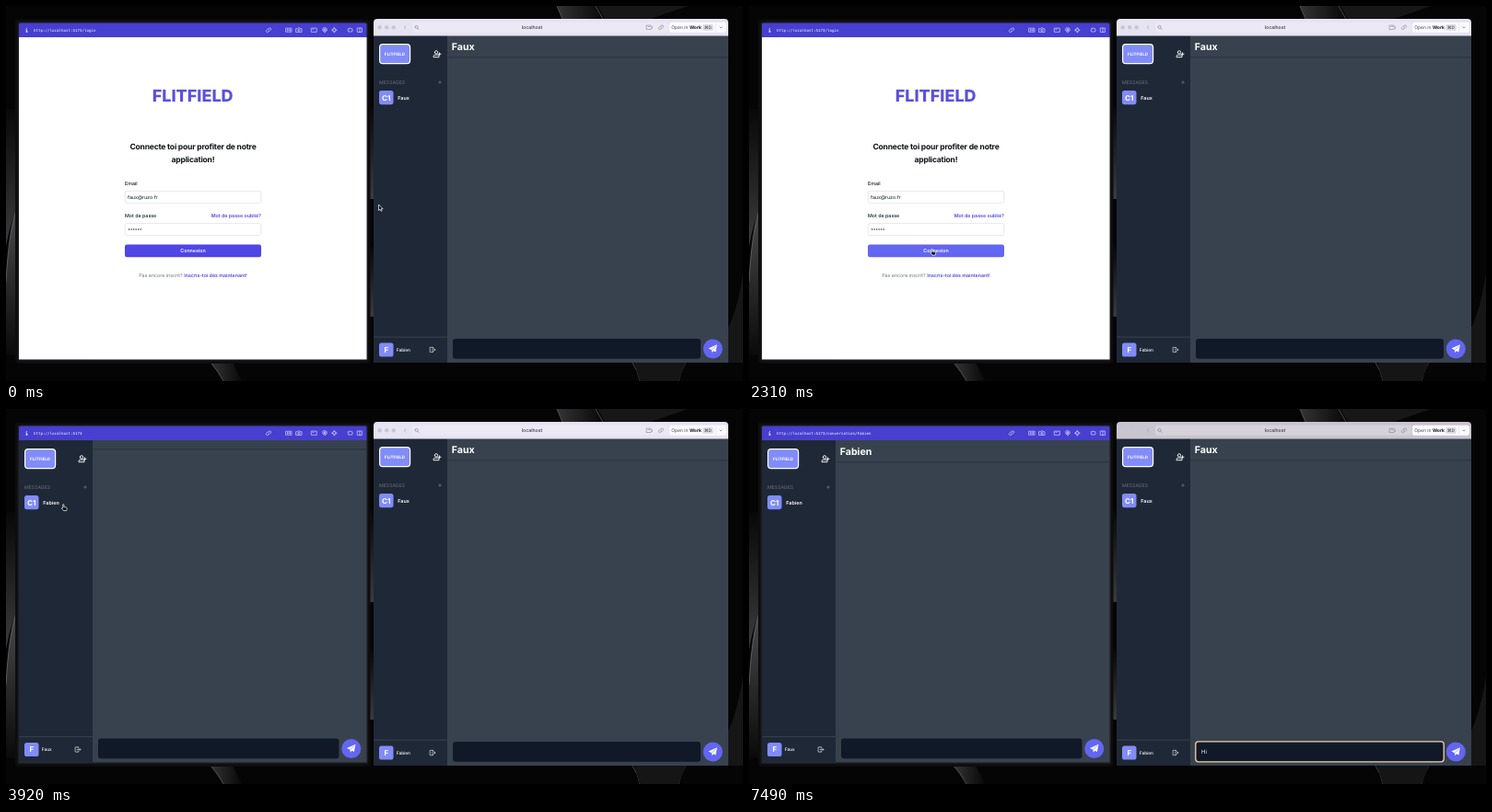
Recreate the animation shown at these times as an HTML page. Size 800x408 px, loop 8000 ms.

```html
<!DOCTYPE html>
<html lang="fr">
<head>
<meta charset="utf-8">
<title>Chat demo</title>
<style>
html, body { margin: 0; width: 100%; height: 100%; overflow: hidden; background: #050505; }
svg { display: block; width: 100vw; height: 100vh; }
text { font-family: Inter, "Liberation Sans", sans-serif; text-rendering: geometricPrecision; white-space: pre; }
.mono { font-family: "DejaVu Sans Mono", monospace; }
</style>
</head>
<body>
<svg id="stage" viewBox="0 0 800 408"></svg>
<script>
const BRAND = 'FLITFIELD', USER = 'Faux', FRIEND = 'Fabien', MAIL = 'faux@ruzo.fr';
const INDIGO = '#4f46e5', SOFT = '#818cf8';

const rect = (x, y, w, h, fill, r = 0, more = '') =>
  `<rect x="${x}" y="${y}" width="${w}" height="${h}" rx="${r}" fill="${fill}" ${more}/>`;
const text = (x, y, size, weight, fill, str, more = '') =>
  `<text x="${x}" y="${y}" font-size="${size}" font-weight="${weight}" fill="${fill}" ${more}>${str}</text>`;
const mid = 'text-anchor="middle"';
const group = (id, body, more = '') => `<g id="${id}" ${more}>${body}</g>`;
const icon = (x, y, d, color, w = .7) =>
  `<path transform="translate(${x} ${y})" d="${d}" fill="none" stroke="${color}" stroke-width="${w}" stroke-linecap="round" stroke-linejoin="round"/>`;

const ICONS = {
  link: 'M-.6 .9a1.3 1.3 0 0 0 1.9 0l1-1a1.3 1.3 0 0 0-1.9-1.9l-.5 .5M.6-.9a1.3 1.3 0 0 0-1.9 0l-1 1a1.3 1.3 0 0 0 1.9 1.9l.5-.5',
  photo: 'M-3-2H3V2H-3ZM-1.3-1V1M1.3-1V1M-1.3 0H1.3',
  camera: 'M-3-1.5H-1.4L-.9-2.3H.9L1.4-1.5H3V2.2H-3ZM-1.1 .3a1.1 1.1 0 1 0 2.2 0a1.1 1.1 0 1 0-2.2 0',
  frame: 'M-2.8-2.1H2.8V2.1H-2.8ZM-1.6-.9H-.4',
  shield: 'M0-2.6L2.2-1.6V.6L0 2.6L-2.2 .6V-1.6ZM-1-.8H1M-1 .4H1M0-1.6V1.4',
  target: 'M-1.9 0a1.9 1.9 0 1 0 3.8 0a1.9 1.9 0 1 0-3.8 0M0-2.8V-1.2M0 2.8V1.2M-2.8 0H-1.2M2.8 0H1.2',
  puzzle: 'M-2-1.6H-.7a.7 .7 0 0 1 1.4 0H2V-.6a.7 .7 0 0 1 0 1.4V1.8H-2V.8a.7 .7 0 0 1 0-1.4Z',
  split: 'M-2.4-2.2H2.4V2.2H-2.4ZM0-2.2V2.2',
  search: 'M-2-.4a1.6 1.6 0 1 0 3.2 0a1.6 1.6 0 1 0-3.2 0M.8 .9L2.2 2.3',
  person: 'M-2.7-1.6a1.7 1.7 0 1 0 3.4 0a1.7 1.7 0 1 0-3.4 0M-4 3.3V2.8a1.7 1.7 0 0 1 1.7-1.6H.3A1.7 1.7 0 0 1 2 2.8V3.3ZM2.6-1.1V1.7M1.2 .3H4',
  exit: 'M.6-2.6H-2.6V2.6H.6M-.6 0H3.2M2-1.3L3.3 0L2 1.3M.6-2.6V-1.4M.6 2.6V1.4'
};

function wallpaper() {
  const grad = (id, a, b, dir) =>
    `<linearGradient id="${id}" ${dir}><stop offset="0" stop-color="${a}"/><stop offset="1" stop-color="${b}"/></linearGradient>`;
  return `<defs>${grad('down', '#4a4a4c', '#0a0a0a', 'x2="0" y2="1"')}
    ${grad('up', '#080808', '#3c3c3e', 'x2="0" y2="1"')}${grad('side', '#343436', '#080808', '')}</defs>` +
    rect(0, 0, 800, 408, '#050505') +
    '<path d="M0 112H11V222Q4 238 0 262Z" fill="url(#up)"/>' +
    '<path d="M11 222Q3 246 0 300V380H11Z" fill="url(#down)"/>' +
    '<path d="M11 222Q3 246 0 300" fill="none" stroke="#777" stroke-width=".7"/>' +
    '<path d="M598 0H640L648 14H604Z" fill="url(#side)"/>' +
    '<path d="M642 0H740L700 14H650Z" fill="#171718"/>' +
    '<path d="M598 0L604 14M640 0L648 14" stroke="#5c5c5e" stroke-width=".8"/>' +
    '<path d="M222 388H246L256 408H236Z" fill="url(#side)"/>' +
    '<path d="M222 388Q230 396 236 408M680 388Q686 397 688 408M738 388Q732 398 730 408" fill="none" stroke="#555" stroke-width=".8"/>' +
    '<path d="M682 388H738L730 408H688Z" fill="#151516"/>' +
    '<path d="M784 388V350Q794 330 800 290V388Z" fill="#161617"/>' +
    rect(395, 110, 4, 100, 'url(#up)') + rect(395, 262, 4, 76, 'url(#up)') +
    rect(10, 14.5, 385.5, 374.5, '#0d0d0e', 4) +
    rect(12.5, 17.2, 380.5, 369, '#1b1b1e', 2);
}

// Chat page: sidebar on the left, conversation on the right
function page(id, x, y, w, h, me, other) {
  const b = y + h;
  const avatar = (ay, label) => rect(x + 6, ay, 15.5, 15.2, SOFT, 2.6) +
    text(x + 13.8, ay + 10.5, 8, 700, '#fff', label, mid);
  const line = ly => rect(x + 80, ly, w - 80, .8, '#28323f') + rect(x + 80, ly + .8, w - 80, 1, '#323c49');
  return rect(x, y, w, h, '#38424f') + rect(x, y, 80, h, '#1f2837') +
    rect(x + 6.6, y + 9.6, 33, 21, SOFT, 3.4, 'stroke="#fff" stroke-width="1.2"') +
    text(x + 23, y + 21.7, 4.5, 700, '#fff', BRAND, mid) +
    icon(x + 69, y + 20, ICONS.person, '#fff', .9) +
    text(x + 6, y + 52.9, 5.2, 400, '#6b7280', 'MESSAGES') +
    icon(x + 72, y + 51, 'M-1.4 0H1.4M0-1.4V1.4', '#8b93a0', .5) +
    group(id + 'None', text(x + 6, y + 66.7, 5.8, 600, '#fff', 'Aucune Conversations')) +
    group(id + 'List', avatar(y + 60, 'C1') + text(x + 26.3, y + 69.8, 5.4, 600, '#fff', other)) +
    rect(x, b - 28.2, 80, .6, '#46505e') + avatar(b - 21.6, me[0]) +
    text(x + 24.7, b - 12.2, 4.8, 500, '#fff', me) +
    icon(x + 63.7, b - 14, ICONS.exit, '#d5d8de', .7) +
    group(id + 'Thin', line(y + 9)) +
    group(id + 'Head', line(y + 23) + text(x + 84.7, y + 15.8, 10.6, 700, '#fff', other)) +
    group(id + 'Box', rect(x + 86, b - 26, w - 116, 21.7, '#111827', 3) +
      `<circle cx="${x + w - 16.7}" cy="${b - 15}" r="10.5" fill="#6366f1"/>` +
      `<g transform="translate(${x + w - 16.7} ${b - 15})"><path d="M4.6-4.8L-4.8-.5L-1.4 1.2L-.9 4.3L.5 2.2L3.1 3.5Z" fill="#fff"/>
       <path d="M3.4-3.3L-1.2 1.3" stroke="#6366f1" stroke-width=".6"/></g>`);
}

function login() {
  const field = y => rect(129.2, y, 147.6, 13, '#fff', 2, 'stroke="#d6d8de" stroke-width=".6"');
  let dots = '';
  for (let i = 0; i < 6; i++) dots += `<circle cx="${133.6 + i * 2.5}" cy="243" r=".75" fill="#222"/>`;
  const head = (y, s) => text(203, y, 8.55, 700, '#111318', s, mid + ' letter-spacing="-.21"');
  return rect(14, 34, 377.5, 350.5, '#fff') +
    text(202.7, 103.5, 18, 800, '#5b50dc', BRAND, mid) +
    head(156, 'Connecte toi pour profiter de notre') + head(169.8, 'application!') +
    text(129, 195, 5.3, 500, '#111827', 'Email') + field(201.3) +
    text(132, 209.9, 5.3, 400, '#111827', MAIL) +
    text(129, 230.3, 5.3, 500, '#111827', 'Mot de passe') +
    text(277, 230.3, 5.3, 600, INDIGO, 'Mot de passe oublié?', 'text-anchor="end"') +
    field(236.6) + dots +
    rect(129, 259.6, 148, 13.6, INDIGO, 2.2, 'id="button"') +
    text(203, 268.3, 5.3, 600, '#fff', 'Connexion', mid) +
    text(203, 295, 5.3, 400, '#6b7280',
      `Pas encore inscrit? <tspan font-weight="600" fill="${INDIGO}">Inscris-toi dés maintenant!</tspan>`, mid);
}

function leftBar() {
  const marks = { link: 285, photo: 307, camera: 318, frame: 334.5, shield: 346, target: 356.3, puzzle: 373.7, split: 384 };
  return '<path d="M14 34V20.5a2 2 0 0 1 2-2H389.5a2 2 0 0 1 2 2V34Z" fill="#463fd0"/>' +
    icon(22.5, 26.3, 'M-.8-.4H0V1.7M-1 1.7H1M0-1.9V-1.7', '#fff', .7) +
    text(30, 28, 4.17, 400, '#fff', '', 'id="url" class="mono"') +
    Object.keys(marks).map(k => icon(marks[k], 26.2, ICONS[k], '#d4d2fa', .7)).join('');
}

function rightBar() {
  let dots = '';
  for (const x of [405.7, 413.2, 420.7]) dots += `<circle cx="${x}" cy="23.3" r="2.2" fill="#c9c6d3"/>`;
  return '<path id="bar" d="M399 32.5V18a4 4 0 0 1 4-4H780a4 4 0 0 1 4 4V32.5Z"/>' + dots +
    icon(433, 23.3, 'M.9-1.7L-.9 0L.9 1.7', '#a09dab') +
    rect(441, 17.8, 278, 11, '#fff', 2.5, 'fill-opacity=".22"') +
    icon(446, 23.3, ICONS.search, '#817e8c', .6) +
    text(571, 25.2, 5.2, 500, '#3c3a45', 'localhost', mid) +
    icon(698.5, 23.3, 'M-3-2.2H1.6V-.6H3V1H1.6V2.2H-3ZM-1.4-.8H.2', '#85828f', .6) +
    icon(711, 23.3, ICONS.link, '#85828f', .6) +
    rect(720, 17.8, 62, 11, '#fbfaff', 2.5) +
    text(722.2, 25.1, 5, 400, '#4a4852', 'Open in <tspan font-weight="700" fill="#18171c">Work</tspan>') +
    rect(756.3, 20, 11.4, 6.8, '#dddbe5', 1.4) + text(762, 25, 4.6, 500, '#4a4852', '⌘D', mid) +
    rect(770.4, 18.6, .5, 9.4, '#d9d7e0') + icon(776, 23.4, 'M-1.1-.5L0 .6L1.1-.5', '#55535e', .6);
}

const cursors =
  group('arrow', '<path d="M0 0V6.4L1.5 5.1L2.5 7.2L3.5 6.8L2.6 4.7H4.6Z" fill="#0b0b0b" stroke="#fff" stroke-width=".7"/>') +
  group('hand', '<path d="M.2-1.2Q.9-1.9 1.4-1V1.6L4 2.2Q4.9 2.5 4.7 3.4L4.2 5.6H1L-1 3.2Q-1.1 2.2 .2 2.9Z" fill="#0b0b0b" stroke="#fff" stroke-width=".7"/>') +
  group('beam', icon(0, 0, 'M-1.3-3.4Q0-3.4 0-2.6V2.6Q0 3.4-1.3 3.4M1.3-3.4Q0-3.4 0-2.6M0 2.6Q0 3.4 1.3 3.4', '#e8e8e8', .7));

document.getElementById('stage').innerHTML = wallpaper() +
  page('l', 14, 34, 377.5, 350.5, USER, FRIEND) + group('login', login()) + leftBar() +
  page('r', 399, 32, 385, 356, FRIEND, USER) + rightBar() +
  group('ring', rect(484.8, 361.8, 269.4, 22, 'none', 3, 'stroke="#f5d0ac" stroke-width="1.3"')) +
  text(491, 375.2, 6, 400, '#fff', '', 'id="typed"') + group('cursor', cursors);

const $ = id => document.getElementById(id);
const show = (id, on) => $(id).setAttribute('display', on ? 'inline' : 'none');
const label = (id, s) => { if ($(id).textContent !== s) $(id).textContent = s; };
const ease = k => k * k * (3 - 2 * k);

// Pointer stops: time, x, y
const PATH = [
  [0, 404.5, 216], [650, 404.5, 216], [980, 234.5, 231.5], [1500, 198, 265.5],
  [3150, 198, 265.5], [3570, 61.5, 105], [4130, 61.5, 105], [5110, 546.5, 375.3],
  [5600, 546.5, 375.3], [5950, 545, 371], [6230, 545, 371], [6300, 563, 373], [8000, 563, 373]
];

function pointer(t) {
  let i = 1;
  while (PATH[i][0] < t) i++;
  const [t0, x0, y0] = PATH[i - 1], [t1, x1, y1] = PATH[i];
  const k = ease((t - t0) / (t1 - t0));
  return [x0 + (x1 - x0) * k, y0 + (y1 - y0) * k];
}

function draw(t) {
  const [x, y] = pointer(t);
  const inside = (a, b, c, d) => x > a && x < c && y > b && y < d;
  const out = t < 2730, listed = t >= 2870, open = t >= 3990, focus = t >= 6300;
  const onButton = out && inside(129, 259, 277, 273);
  const onLink = out && inside(222, 225, 277, 233);
  const onChat = listed && inside(20, 93, 88, 110);

  show('login', out);
  show('lNone', !listed);
  show('lList', listed);
  show('lThin', t >= 3920 && !open);
  show('lHead', open);
  show('lBox', t >= 3920);
  show('rNone', false);
  show('rThin', false);
  label('url', 'http://localhost:5173' + (out ? '/login' : open ? '/conversation/' + FRIEND : ''));
  $('button').setAttribute('fill', onButton ? '#6366f1' : INDIGO);
  $('bar').setAttribute('fill', focus ? '#c9c5cf' : '#e6e3f2');
  show('ring', focus);
  label('typed', t < 6790 ? '' : t < 7000 ? 'H' : 'Hi');

  const hand = onButton || onLink || onChat;
  show('cursor', t < 6510);
  show('hand', hand);
  show('beam', focus);
  show('arrow', !hand && !focus);
  $('cursor').setAttribute('transform', `translate(${x} ${y})`);
}

const start = performance.now();
function tick() {
  draw((performance.now() - start) % 8000);
  requestAnimationFrame(tick);
}
tick();
</script>
</body>
</html>
```
